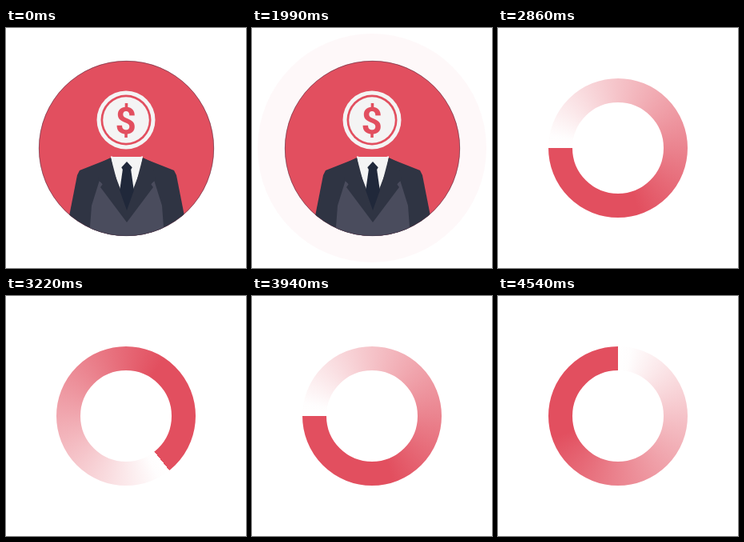
These frames come from a looping animation (300x300 px, 4.57 s). An HTML page with a canvas:

```html
<!DOCTYPE html>
<html lang="en">
<head>
<meta charset="utf-8">
<title>Pulse and spinner</title>
<style>
html, body { margin: 0; width: 100%; height: 100%; overflow: hidden; background: #fff; }
canvas { display: block; width: 300px; height: 300px; }
</style>
</head>
<body>
<canvas id="stage" width="300" height="300"></canvas>
<script>
const ctx = document.getElementById('stage').getContext('2d');
const TAU = Math.PI * 2;
const LOOP = 4570, TICK = 30;
const PULSE_START = 370, PULSE_END = 1990;
const RING_START = 2360, SPIN_START = 2500;
const RED = '#e24f5f', PALE = '#f4f4f4', NAVY = '#2f3443', SLATE = '#4a4c5d', INK = '#20283a';

// Spinner pace: [tick, turns] pairs, linear in between.
const PACE = [[0, 0], [12, 0.75], [40, 2.25], [56, 3.25], [68, 4]];

const clamp = v => Math.max(0, Math.min(1, v));

function disc(x, y, r, fill) {
  ctx.beginPath();
  ctx.arc(x, y, r, 0, TAU);
  ctx.fillStyle = fill;
  ctx.fill();
}

function poly(fill, ...pts) {
  ctx.beginPath();
  for (let i = 0; i < pts.length; i += 2) ctx.lineTo(pts[i], pts[i + 1]);
  ctx.closePath();
  ctx.fillStyle = fill;
  ctx.fill();
}

// Draws a polygon and its reflection about the tie.
function pair(fill, ...pts) {
  poly(fill, ...pts);
  poly(fill, ...pts.map((v, i) => i % 2 ? v : 302 - v));
}

function coin() {
  disc(150, 115, 36.5, PALE);
  disc(150, 115, 31.5, RED);
  disc(150, 115, 28.8, PALE);
  ctx.font = '700 46px Roboto, Arial, sans-serif';
  ctx.textAlign = 'left';
  ctx.textBaseline = 'alphabetic';
  ctx.fillStyle = RED;
  const m = ctx.measureText('$');
  const x = 150 - (m.actualBoundingBoxRight - m.actualBoundingBoxLeft) / 2;
  const y = 115 + (m.actualBoundingBoxAscent - m.actualBoundingBoxDescent) / 2;
  ctx.fillText('$', x, y);
}

function suit() {
  pair(NAVY, 151, 163, 130, 163, 92, 178, 89, 184, 78, 240, 92, 262, 151, 262);
  pair(SLATE, 117, 190, 107, 222, 104, 262, 151, 262, 151, 242);
  poly(PALE, 131, 161, 171, 161, 168, 178, 151, 222, 134, 178);
  poly(INK, 146, 176, 156, 176, 160, 204, 151, 234, 142, 204);
  poly(INK, 146, 167, 156, 167, 159, 172, 155, 179, 147, 179, 143, 172);
  pair(NAVY, 131, 162, 119, 168, 115, 190, 121, 195, 118, 199, 151, 243, 151, 228, 141, 200);
  pair(PALE, 131, 160, 151, 167, 138, 181);
}

function badge() {
  ctx.save();
  ctx.beginPath();
  ctx.arc(150.5, 150.5, 109.5, 0, TAU);
  ctx.clip();
  ctx.fillStyle = RED;
  ctx.fillRect(40, 40, 222, 222);
  coin();
  suit();
  ctx.restore();
  ctx.beginPath();
  ctx.arc(150.5, 150.5, 109.2, 0, TAU);
  ctx.lineWidth = 0.8;
  ctx.strokeStyle = 'rgba(70, 55, 75, .65)';
  ctx.stroke();
}

function halo(t) {
  const u = clamp((t - PULSE_START + TICK) / (PULSE_END - PULSE_START));
  const grow = 1 - (1 - clamp(u / 0.3)) ** 2;
  const alpha = 0.04 + 0.26 * (1 - u) ** 5;
  disc(150, 150, 109 + 34 * grow, `rgba(226, 79, 95, ${alpha})`);
}

function turns(n) {
  const i = Math.max(1, PACE.findIndex(p => p[0] >= n));
  const [n0, a] = PACE[i - 1], [n1, b] = PACE[i];
  return a + (b - a) * (n - n0) / (n1 - n0);
}

function spinner(t) {
  const n = Math.max(0, Math.floor((t - SPIN_START) / TICK));
  const head = (turns(Math.min(n, 68)) % 1) * TAU - Math.PI / 2;
  const g = ctx.createConicGradient(head, 150, 150);
  g.addColorStop(0, 'rgba(226, 79, 95, 0)');
  g.addColorStop(0.03, 'rgba(226, 79, 95, .01)');
  g.addColorStop(0.25, 'rgba(226, 79, 95, .34)');
  g.addColorStop(0.5, 'rgba(226, 79, 95, .7)');
  g.addColorStop(0.7, RED);
  g.addColorStop(1, RED);
  ctx.beginPath();
  ctx.arc(150, 150, 72, 0, TAU);
  ctx.lineWidth = 30;
  ctx.strokeStyle = g;
  ctx.stroke();
}

function draw(now) {
  const t = now % LOOP;
  ctx.fillStyle = '#fff';
  ctx.fillRect(0, 0, 300, 300);
  if (t >= RING_START) {
    spinner(t);
  } else {
    if (t >= PULSE_START) halo(Math.floor((t - 10) / TICK) * TICK + 10);
    badge();
  }
}

let start;
function frame(now) {
  start ??= now;
  draw(now - start);
  requestAnimationFrame(frame);
}
draw(0);
requestAnimationFrame(frame);
</script>
</body>
</html>
```
